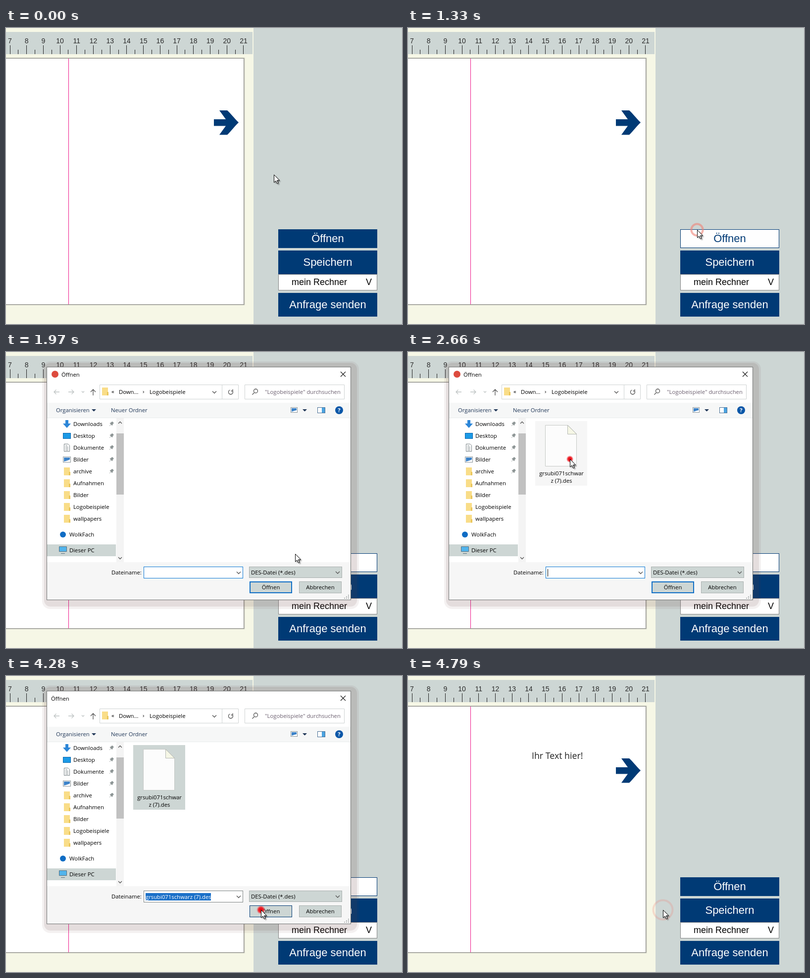
Animation, 800 px wide and 600 px high, one loop 4.82 s. Source, as an HTML page:

```html
<!DOCTYPE html>
<html lang="de">
<head>
<meta charset="utf-8">
<title>Datei öffnen</title>
<style>
  html, body { margin: 0; width: 100%; height: 100%; overflow: hidden; background: #cdd6d4; }
  svg { display: block; width: 800px; height: 600px; }
  text { font-family: "Liberation Sans", Arial, sans-serif; white-space: pre; }
  .mid { text-anchor: middle; }
  .big { font-size: 22px; fill: #fff; text-anchor: middle; }
  .num { font-size: 14px; fill: #2a2a2a; text-anchor: middle; }
  .win text { font: 11.3px "Open Sans", "Noto Sans", sans-serif; }
  .win { transform-origin: 389px 266px; }
  .line { fill: none; stroke: #555; stroke-width: 1.3; }
  .soft { stroke: #bfc4c4; }
</style>
</head>
<body>
<svg viewBox="0 0 800 600">
  <defs>
    <radialGradient id="red">
      <stop offset="0" stop-color="#e8000c"/>
      <stop offset=".55" stop-color="#ee1c24" stop-opacity=".95"/>
      <stop offset="1" stop-color="#f04a50" stop-opacity="0"/>
    </radialGradient>
    <filter id="blur" x="-50%" y="-50%" width="200%" height="200%"><feGaussianBlur stdDeviation="1.2"/></filter>
    <path id="arrow" d="M.5 .5V16.2L4.1 12.8L6.6 18.6L9 17.6L6.6 11.9H11.6Z"/>
    <path id="pin" d="M1 9l3-3M2 3.500l4.500 4.500 1-3 2-2-3-3-2 2z" fill="#8c9494" stroke="#8c9494" stroke-width=".8"/>
  </defs>

  <rect width="500" height="600" fill="#f6f7e6"/>
  <rect x="500" width="300" height="600" fill="#cdd6d4"/>
  <rect y="8" width="498" height="45" fill="#cdd6d4"/>
  <g id="ruler"></g>
  <rect x="-9" y="60" width="491.500" height="502" rx="1" fill="#c9cabf"/>
  <rect x="-9" y="61.500" width="489.500" height="499" fill="#fff" stroke="#8b8b85"/>
  <path d="M126.500 62V560" stroke="#ee1a8c"/>
  <path d="M420 185H444L431 167H447C453 172 461 183 470 191.500C461 200 453 211 447 216.500H431L444 198.500H420Z" fill="#003a75"/>
  <text id="note" x="250" y="168" fill="#222" style="font:17.75px 'Open Sans',sans-serif">Ihr Text hier!</text>

  <rect id="openBtn" x="550.500" y="408.500" width="199" height="37" stroke="#003a75"/>
  <text id="openTxt" class="big" x="650" y="434">Öffnen</text>
  <rect x="550" y="451" width="200" height="48" fill="#003a75"/>
  <text class="big" x="650" y="482">Speichern</text>
  <rect x="550.500" y="499.500" width="199" height="32" fill="#fff" stroke="#858585"/>
  <text x="577" y="521" font-size="18">mein Rechner</text>
  <text class="mid" x="733" y="521" font-size="18">V</text>
  <rect x="550" y="537" width="200" height="48" fill="#003a75"/>
  <text class="big" x="650" y="568">Anfrage senden</text>

  <g class="win" id="win">
    <rect x="73" y="19" width="640" height="502" rx="16" fill="#643c3c" opacity=".07"/>
    <rect x="77" y="22" width="632" height="494" rx="13" fill="#643c3c" opacity=".11"/>
    <rect x="82.500" y="30.500" width="614" height="472" fill="#fff" stroke="#707372"/>
    <rect x="83" y="426" width="613" height="76" fill="#f6f6f6"/>
    <g id="titleA"><circle cx="99" cy="45" r="7" fill="#dd4b3e"/><text x="112" y="50">Öffnen</text></g>
    <text id="titleB" x="91" y="50">Öffnen</text>
    <path class="line" stroke-width="1.100" d="M676 40l10 10M686 40l-10 10" style="stroke:#222"/>
    <rect x="223" y="134" width="15" height="292" fill="#f4f4f4"/>

    <g id="blank">
      <rect x="223" y="151" width="15" height="163" fill="#b4c0bd"/>
      <g fill="#fff">
        <rect x="213" y="438" width="61" height="16"/><rect x="277" y="434" width="201" height="25"/>
        <rect x="490" y="435" width="190" height="24"/><rect x="490" y="464" width="90" height="26"/>
        <rect x="590" y="464" width="90" height="26"/>
      </g>
    </g>

    <g id="full">
      <path class="line soft" d="M108 81H97m4.500-4.500L97 81l4.500 4.500M126 81h11m-4.500-4.500L137 81l-4.500 4.500M153 79.500l2.500 2.500 2.500-2.500"/>
      <path class="line" d="M176 88V76m-5 5l5-5 5 5M417 79.500l4 4 4-4"/>
      <path fill="none" stroke="#cfd3d3" d="M189.500 66.500H469.500V95.500H189.500ZM436.500 66.500V95.500M482.500 66.500H683.500V95.500H482.500Z"/>
      <path class="line" d="M457.500 78.500a4.500 4.500 0 1 1-5-1.500M458 75.500v3.500h-3.500"/>
      <path class="line" stroke-width="1" d="M497.500 86.500l4-4"/><circle class="line" cx="504.500" cy="79" r="4"/>
      <text x="213" y="84">«</text><text x="228" y="85">Down...</text><text x="276" y="84">›</text>
      <text x="290" y="85">Logobeispiele</text>
      <text x="523" y="85" fill="#6c6070">"Logobeispiele" durchsuchen</text>

      <rect x="83" y="103" width="613" height="30" fill="#f6f7f7"/>
      <path d="M83 133.500H696" stroke="#e9ecec"/>
      <g fill="#1e3556">
        <text x="101" y="122">Organisieren</text><text x="212" y="122">Neuer Ordner</text>
        <path d="M173 116h9l-4.500 4.500zM599 116h9l-4.500 4.500z"/>
      </g>
      <rect x="575.500" y="112.500" width="13" height="10" fill="#fff" stroke="#8a9499"/>
      <path d="M577 114h10v4l-4 1-6 2z" fill="#3c82c8"/>
      <rect x="629.500" y="112.500" width="15" height="11" fill="#fff" stroke="#4a7096"/>
      <rect x="638" y="113" width="6" height="10" fill="#4ba3e0"/>
      <circle cx="673" cy="118" r="8" fill="#0b57a8"/>
      <text class="mid" x="673" y="122" fill="#fff" style="font-weight:bold">?</text>

      <rect x="83" y="390" width="139" height="24" fill="#cdd6d4"/>
      <g id="tree"></g>
      <path d="M120 138h6v7h5l-8 9-8-9h5z" fill="#2c86d8"/>
      <rect x="115.500" y="164.500" width="15" height="11" fill="#1c9ae6" stroke="#0b66ad"/>
      <path d="M117.500 186.500h8l3 3v12h-11zM120 190h4m-4 3h6m-6 3h6m-6 3h6" fill="#fff" stroke="#7a8488"/>
      <rect x="115.500" y="212.500" width="15" height="11" fill="#fff" stroke="#8a9499"/>
      <path d="M117 214h12v4l-5 2-7 2z" fill="#3c82c8"/>
      <circle cx="115" cy="370" r="6" fill="#0f6cc4"/>
      <path d="M107.500 394.500h15v10h-15zM111 408.500h8" fill="#52b4ec" stroke="#58707e"/>
      <rect x="223" y="165" width="15" height="124" fill="#c1c1c1"/>
      <path class="line" stroke-width="1.600" d="M227 145l3.500-3.500 3.500 3.500M227 416l3.500 3.500 3.500-3.500"/>

      <g id="file">
        <rect id="hover" x="257" y="140" width="105" height="131" fill="#f6f6f6"/>
        <rect id="picked" x="257" y="140" width="105" height="131" fill="#cdd6d4"/>
        <rect id="pickEdge" x="257.500" y="140.500" width="104" height="130" fill="none" stroke="#a3c9e8"/>
        <path d="M277.500 148.500H323L340.500 166V231.500H277.500Z" fill="#fcfcfc" stroke="#c6c9c6"/>
        <path d="M322.500 148.500V166.500H340.500Z" fill="#f6f7e6" stroke="#b5b8b2"/>
        <text class="mid" x="310" y="250">grsubi071schwar</text>
        <text class="mid" x="310" y="265">z (7).des</text>
      </g>

      <text x="213" y="451">Dateiname:</text>
      <rect id="field" x="278.500" y="435.500" width="200" height="23" fill="#fff"/>
      <path id="caret" d="M282.500 440V455" stroke="#000"/>
      <rect id="mark" x="282" y="440" width="132" height="15" fill="#1b70c8"/>
      <text id="name" x="282" y="452">grsubi071schwarz (7).des</text>
      <rect id="drop" x="462.500" y="435.500" width="16" height="23" fill="#fff" stroke="#0b78d4"/>
      <path class="line" stroke-width="1.100" d="M466 445.500l4 4 4-4"/>
      <rect x="491.500" y="435.500" width="187" height="22" fill="#cdd6d4" stroke="#a9b0af"/>
      <path class="line" stroke-width="1.100" d="M666 445l4 4 4-4"/>
      <text x="495" y="451">DES-Datei (*.des)</text>
      <rect x="492.500" y="465.500" width="85" height="23" fill="#cdd6d4"/>
      <rect id="okWide" x="493" y="466" width="84" height="22" fill="none" stroke="#0f6fc6" stroke-width="2"/>
      <rect id="okThin" x="492.500" y="465.500" width="85" height="23" fill="none"/>
      <text class="mid" x="535" y="481">Öffnen</text>
      <rect x="592.500" y="465.500" width="85" height="23" fill="#cdd6d4" stroke="#a9b0af"/>
      <text class="mid" x="635" y="481">Abbrechen</text>
      <path d="M691 493h2m-2 3h2m-2 3h2m-6-3h2m-2 3h2m-6 0h2" stroke="#b0b4b4" stroke-width="2"/>
    </g>
  </g>

  <g id="clicks"></g>
  <g id="cursor">
    <use href="#arrow" x="2.500" y="2.500" opacity=".45" filter="url(#blur)"/>
    <use href="#arrow" fill="#fff" stroke="#000"/>
  </g>
</svg>
<script>
const LOOP = 4820;
const BLUE = '#003a75';
const $ = id => document.getElementById(id);

// Ruler from 7 to 21 cm
let marks = '';
for (let i = 0; i < 15; i++) {
  const x = 8 + i * 33.71, snap = v => Math.floor(v) + .5;
  marks += `<text class="num" x="${x}" y="31">${i + 7}</text><path d="M${snap(x)} 35V53` +
    (i < 14 ? `M${snap(x + 16.85)} 44V53` : '') + '" stroke="#222"/>';
}
$('ruler').innerHTML = marks;

// Folder tree
const names = ['Downloads', 'Desktop', 'Dokumente', 'Bilder', 'archive', 'Aufnahmen', 'Bilder', 'Logobeispiele', 'wallpapers'];
const folder = (x, y) => `<path d="M${x} ${y}h12v16h-12z" fill="#f9dd88"/><path d="M${x + 10} ${y + 9}h3v7h-3z" fill="#eac65c"/>`;
$('tree').innerHTML = folder(194, 72) + names.map((name, i) => {
  const y = 150 + i * 24;
  return `<text x="136" y="${y}">${name}</text>` +
    (i < 5 ? `<use href="#pin" x="208" y="${y - 9}"/>` : '') +
    (i > 3 ? folder(117, y - 12) : '');
}).join('') + '<text x="128" y="374">WolkFach</text><text x="128" y="406">Dieser PC</text>';

// Rows are [ms, value, easing to the next row]
function track(el, prop, rows, easing = 'linear') {
  const all = [[0, rows[0][1]], ...rows, [LOOP, rows[rows.length - 1][1]]];
  el.animate(all.map(([ms, value, ease = easing]) => ({ offset: ms / LOOP, [prop]: value, easing: ease })),
    { duration: LOOP, iterations: Infinity });
}
const hard = (id, prop, rows) => track($(id), prop, rows, 'step-end');
const show = (id, from, to = LOOP) => hard(id, 'opacity', [[0, 0], [from, 1], [to, to < LOOP ? 0 : 1]]);
const at = (x, y) => `translate(${x}px, ${y}px)`;

track($('cursor'), 'transform', [
  [0, at(541, 297), 'step-end'], [130, at(549, 317), 'step-end'], [160, at(558, 338)],
  [390, at(558, 338), 'ease-out'], [910, at(584, 409)],
  [1970, at(584, 409), 'ease-in-out'], [2480, at(327, 217)],
  [3050, at(327, 217), 'cubic-bezier(.3,.2,.5,1)'], [3530, at(485, 460), 'ease-out'],
  [4050, at(515, 474)], [LOOP - 1, at(515, 474)]
]);

// Click: a dot that grows, then a ring that spreads and fades
function click(start, x, y) {
  const group = $('clicks');
  const add = attrs => {
    group.insertAdjacentHTML('beforeend', `<circle cx="${x}" cy="${y}" ${attrs}/>`);
    return group.lastElementChild;
  };
  const shift = rows => rows.filter(([ms]) => start + ms < LOOP).map(([ms, v]) => [start + ms, v]);
  const dot = add('fill="url(#red)"');
  const ring = add('fill="none" stroke="#f08478" stroke-width="4"');
  track(dot, 'r', shift([[0, '0px'], [90, '7px'], [150, '9px'], [300, '12px']]));
  track(dot, 'opacity', shift([[-1, 0], [0, 1], [260, 1], [380, 0]]));
  track(ring, 'r', shift([[260, '8px'], [510, '15px'], [660, '19.5px'], [689, '19.7px']]));
  track(ring, 'opacity', shift([[250, 0], [320, .7], [510, .45], [660, .25], [689, .2], [750, 0]]));
}
click(940, 584, 409);
click(2560, 327, 217);
click(4130, 515, 474);

// Page button
track($('openBtn'), 'fill', [[850, BLUE], [970, '#f7f7f7'], [1150, '#f7f7f7'], [1350, '#fff'], [4640, '#fff'], [4770, BLUE]]);
track($('openTxt'), 'fill', [[850, '#fff'], [970, BLUE], [4640, BLUE], [4770, '#fff']]);
show('note', 4520);

// Dialog window
track($('win'), 'opacity', [[1480, 0], [1600, .57], [1720, 1], [4340, 1], [4460, 0]]);
track($('win'), 'transform', [[1480, 'scale(.95)'], [1600, 'scale(.98)'], [1720, 'scale(1)'], [4340, 'scale(1)'], [4460, 'scale(.95)']]);
show('blank', 1, 1690);
show('full', 1690);
hard('titleA', 'opacity', [[0, 1], [4160, 0]]);
show('titleB', 4160);

// File and its name field
show('file', 2000);
show('hover', 2400);
show('picked', 2700);
show('pickEdge', 2700, 4160);
show('caret', 2000, 2700);
show('name', 2700);
show('mark', 4160);
hard('name', 'fill', [[0, '#000'], [4160, '#fff']]);
hard('field', 'stroke', [[0, '#0b78d4'], [2700, '#7f8585'], [3440, '#1a2030'], [3620, '#7f8585']]);
show('drop', 3440, 3620);
hard('okWide', 'opacity', [[0, 1], [3650, 0]]);
hard('okThin', 'stroke', [[0, 'none'], [3650, '#0f6fc6'], [4150, BLUE]]);
</script>
</body>
</html>
```
